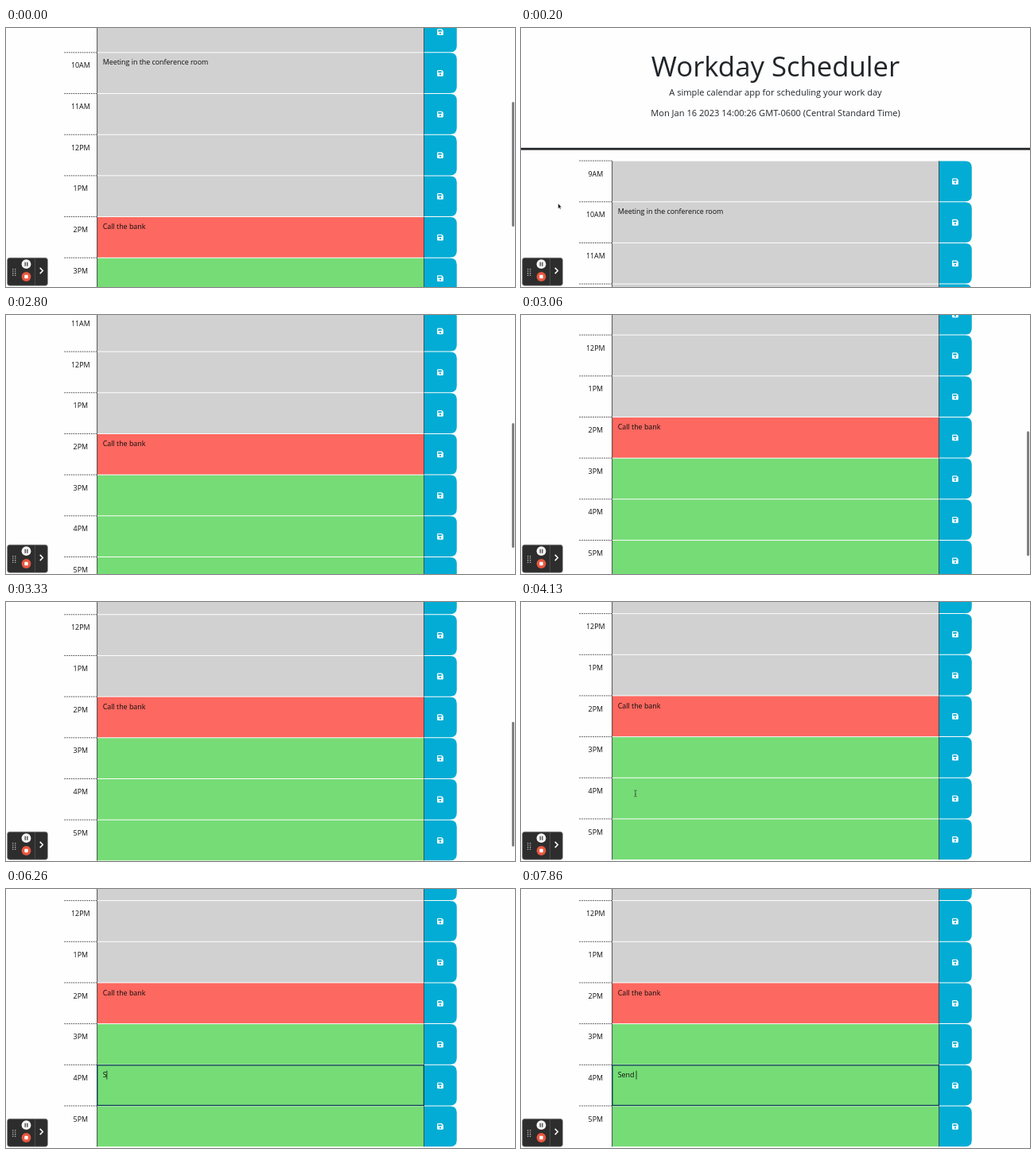
Write an HTML page that moves like this. It is 640 px wide and 326 px high and loops after 8 s.

```html
<!DOCTYPE html>
<html lang="en">
<head>
<meta charset="utf-8">
<title>Workday Scheduler</title>
<style>
html, body { margin: 0; width: 100%; height: 100%; overflow: hidden; background: #fefefe; }
svg { display: block; width: 100%; height: 100%; }
text { font-family: "Open Sans", "Noto Sans", sans-serif; font-size: 8.88px; fill: #0c0c0c; white-space: pre; }
.mid { text-anchor: middle; }
.head { fill: #212529; }
</style>
</head>
<body>
<svg id="stage" viewBox="0 0 640 326">
  <defs>
    <g id="save">
      <path d="M1 0H5.9L7.8 1.9V6.8Q7.8 7.8 6.8 7.8H1Q0 7.8 0 6.8V1Q0 0 1 0Z" fill="#fff"/>
      <rect x="1.2" y="1.2" width="4.4" height="2.1" fill="#03acd4"/>
      <circle cx="3.9" cy="5.5" r="1.15" fill="#03acd4"/>
    </g>
  </defs>
  <g id="page">
    <text class="mid head" x="320" y="60.6" style="font-size:34.7px">Workday Scheduler</text>
    <text class="mid head" x="320" y="85" style="font-size:11.1px">A simple calendar app for scheduling your work day</text>
    <text class="mid head" x="320" y="110.6" style="font-size:11.1px">Mon Jan 16 2023 14:00:26 GMT-0600 (Central Standard Time)</text>
    <rect y="150.8" width="640" height="2.8" fill="#222529"/>
    <g id="rows"></g>
    <g id="focus">
      <rect x="114.8" y="529.3" width="410.6" height="50.6" fill="none" stroke="#0b3d55" stroke-width="1.3"/>
      <rect id="caret" y="536.1" width=".8" height="11" fill="#111"/>
    </g>
  </g>
  <rect id="thumb" x="636.1" width="3" height="157" rx="1.5" fill="#7d7d7d"/>
  <g id="recorder">
    <rect x="1.6" y="289.3" width="50.8" height="35" rx="3" fill="#2d2d2d" stroke="#8b8b8b" stroke-width=".7"/>
    <path d="M8.7 302.9V312M11.7 302.9V312" stroke="#b9b9b9" stroke-width="1.3" stroke-dasharray="1.3 1.3"/>
    <path d="M36.4 290V324" stroke="#555" stroke-width=".8"/>
    <circle cx="25.5" cy="297.2" r="5.9" fill="#f4f4f4"/>
    <path d="M24.2 294.7V299.7M26.8 294.7V299.7" stroke="#333" stroke-width="1.2"/>
    <circle cx="25.5" cy="313" r="5.9" fill="#e9573f"/>
    <rect x="23.3" y="310.8" width="4.4" height="4.4" rx=".6" fill="#fff"/>
    <path d="M42.7 301.9L46.3 305.5L42.7 309.1" fill="none" stroke="#fff" stroke-width="1.5"/>
  </g>
  <path id="arrow" d="M0 0V6.6L1.5 5.3L2.5 7.5L3.6 7L2.6 4.9H4.6Z" fill="#111" stroke="#fff" stroke-width=".5"/>
  <path id="beam" d="M-1.7 -4Q0 -4 0 -3V3Q0 4 -1.7 4M1.7 -4Q0 -4 0 -3M0 3Q0 4 1.7 4M-.9 .9H.9" fill="none" stroke="#3b4a3b" stroke-width=".8"/>
</svg>
<script>
const LOOP = 8000, TICK = 200 / 3, TOP = 167.1, PITCH = 51.67;
const $ = id => document.getElementById(id);
const notes = { 10: "Meeting in the conference room", 14: "Call the bank" };

// [time, scroll offset]; the page holds each offset until the next one
const scrolls = [
  [0, 187.9], [60, 95], [130, 24], [200, 0],
  [2530, 198], [2600, 238], [2660, 260], [2800, 276], [2860, 283],
  [3060, 297], [3130, 300.5], [3200, 303], [3260, 305], [3330, 306.3], [3400, 307], [3460, 307.5]
];
const keys = [[4730, ""], [6200, "S"], [6460, "Se"], [6730, "Sen"], [7000, "Send"], [7730, "Send "]];
const moves = [[3730, 58, 226], [4130, 144, 241], [4460, 139, 239], [4930, 139, 239], [5060, 141, 240]];

const held = (list, t) => list.filter(k => k[0] <= t).pop();
const show = (el, on) => el.setAttribute("visibility", on ? "visible" : "hidden");
const place = (el, x, y) => el.setAttribute("transform", `translate(${x} ${y})`);

function row(hour) {
  const y = TOP + (hour - 9) * PITCH, b = y + PITCH - .5;
  const fill = hour < 14 ? "#d1d1d1" : hour === 14 ? "#fd6860" : "#76dc76";
  const label = (hour > 12 ? hour - 12 : hour) + (hour < 12 ? "AM" : "PM");
  return `
    <path d="M73.3 ${y}H114.5" stroke="#222" stroke-width=".8" stroke-dasharray="1.7 1.1"/>
    <text class="mid" x="93.8" y="${y + 19.6}">${label}</text>
    <rect x="114.5" y="${y + .5}" width="411" height="${PITCH - 1}" fill="${fill}"/>
    <path d="M526 ${y + .5}H558.6Q566.8 ${y + .5} 566.8 ${y + 8.7}V${b - 8.2}Q566.8 ${b} 558.6 ${b}H526Z" fill="#03acd4"/>
    <path d="M114.6 ${y + .2}V${b + .3}M525.5 ${y + .2}V${b + .3}" stroke="#2b2b2b" stroke-width=".8"/>
    <use href="#save" x="542.1" y="${y + 22.1}"/>
    <text id="note${hour}" x="121.7" y="${y + 15.6}">${notes[hour] || ""}</text>`;
}

$("rows").innerHTML = Array.from({ length: 9 }, (_, i) => row(i + 9)).join("");
const [page, focus, caret, thumb, arrow, beam, entry] =
  ["page", "focus", "caret", "thumb", "arrow", "beam", "note16"].map($);

function pointer(t) {
  if (t < moves[0][0]) return [46.6, 220.8];
  const i = moves.findIndex(m => m[0] > t);
  if (i < 0) return moves[moves.length - 1].slice(1);
  const [t0, x0, y0] = moves[i - 1], [t1, x1, y1] = moves[i];
  const p = (t - t0) / (t1 - t0), e = p * (2 - p);
  return [x0 + (x1 - x0) * e, y0 + (y1 - y0) * e];
}

function draw(t) {
  const scroll = held(scrolls, t)[1];
  place(page, 0, -scroll);
  thumb.setAttribute("y", 1.7 + scroll * .4865);
  const fade = Math.min(1, Math.max(0, (3930 - t) / 200));
  thumb.setAttribute("opacity", scroll ? fade : 0);

  const tick = Math.floor((t + 4) / TICK) * TICK;
  const [x, y] = pointer(tick);
  const seen = t >= 200 && t < 2530 || t >= 3730 && t < 6200;
  place(arrow, x, y);
  place(beam, x, y);
  show(arrow, seen && x < 115);
  show(beam, seen && x >= 115);

  const key = held(keys, t);
  const text = key ? key[1] : "";
  if (entry.textContent !== text) entry.textContent = text;
  show(focus, key);
  show(caret, key && (t - key[0]) % 1000 < 500);
  caret.setAttribute("x", 121.6 + (text ? entry.getComputedTextLength() : 0));
}

const start = performance.now();
function loop() {
  draw((performance.now() - start) % LOOP);
  requestAnimationFrame(loop);
}
loop();
</script>
</body>
</html>
```
